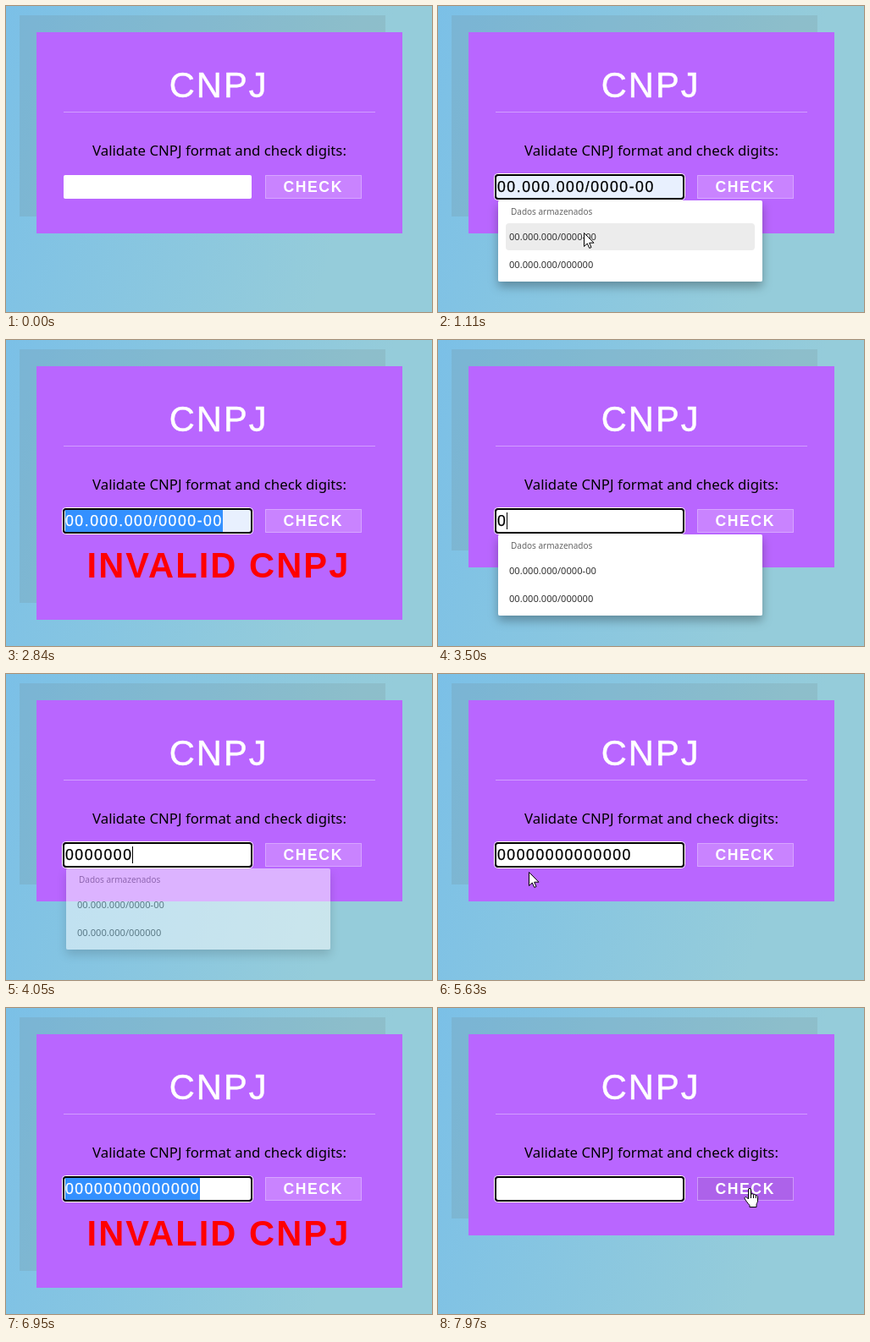
Animation, 503 px wide and 362 px high, one loop 8 s. Source, as an HTML page:

```html
<!DOCTYPE html>
<html lang="en">
<head>
<meta charset="utf-8">
<title>Format check</title>
<style>
  html, body { margin: 0; width: 100%; height: 100%; overflow: hidden; }
  svg { display: block; width: 503px; height: 362px; }
  text { white-space: pre; }
  .arial { font-family: "Liberation Sans", Arial, sans-serif; }
  .noto { font-family: "Noto Sans", sans-serif; }
  .bold { font-weight: bold; }
  #title, #result { font-size: 41.6px; letter-spacing: 2.08px; }
  #value, #label { font-size: 17.6px; letter-spacing: 1.57px; }
  #title { stroke: #fff; stroke-width: .5px; }
  #value { stroke-width: .25px; }
</style>
</head>
<body>
<svg viewBox="0 0 503 362">
  <defs>
    <linearGradient id="sky" gradientUnits="userSpaceOnUse" x1="0" y1="0" x2="430" y2="115">
      <stop offset="0" stop-color="#7bc0e7"/>
      <stop offset="1" stop-color="#95ccda"/>
    </linearGradient>
    <filter id="soft" x="-20%" y="-20%" width="140%" height="160%">
      <feDropShadow dx="0" dy="6" stdDeviation="6" flood-color="#000" flood-opacity=".3"/>
    </filter>
    <clipPath id="below"><rect y="230" width="503" height="132"/></clipPath>
  </defs>

  <rect width="503" height="362" fill="url(#sky)"/>
  <rect id="shade" x="16" y="11" width="432" fill="#6e8282" opacity=".18"/>
  <rect id="panel" x="36" y="31" width="432" fill="#b966ff"/>

  <text id="title" class="arial" x="192.7" y="108" fill="#fff">CNPJ</text>
  <rect x="68" y="125" width="368" height="1" fill="#fff" opacity=".35"/>
  <text class="noto" x="102" y="176.5" font-size="16.8">Validate CNPJ format and check digits:</text>

  <rect id="button" x="306.5" y="200.5" width="113" height="27" stroke="#fff" stroke-opacity=".35"/>
  <text id="label" class="arial bold" x="327.5" y="220" fill="#fff">CHECK</text>
  <text id="result" class="arial bold" x="95.6" y="281" fill="#f00">INVALID CNPJ</text>

  <rect id="field" x="68" y="200" width="222" height="28" rx="2"/>
  <g id="ring" fill="none">
    <rect x="66.5" y="198.5" width="225" height="31" rx="4" stroke="#fff"/>
    <rect x="68" y="200" width="222" height="28" rx="3" stroke="#000" stroke-width="2"/>
  </g>
  <rect id="selection" x="70" y="201" height="26" fill="#3390ff"/>
  <text id="value" class="arial" x="70" y="220"></text>
  <rect id="caret" y="204" width="1" height="20"/>

  <g clip-path="url(#below)">
    <g id="list" class="noto" font-size="11.15" fill="#333">
      <rect x="71" y="230" width="312" height="96" rx="2" fill="#fff" filter="url(#soft)"/>
      <rect id="row" x="80" y="257" width="294" height="32" rx="4" fill="#ececec"/>
      <text x="86" y="247" font-size="10" fill="#666">Dados armazenados</text>
      <text x="84" y="277">00.000.000/0000-00</text>
      <text x="84" y="310">00.000.000/000000</text>
    </g>
  </g>

  <g id="cursor" fill="#fff" stroke="#000" stroke-linejoin="round">
    <path id="arrow" d="M.5 .5V16.5L4.3 13L6.8 18.5L9 17.5L6.7 12.2H12z"/>
    <g id="hand" transform="translate(-7 -1)">
      <path d="M5.5 13V2a1.5 1.5 0 0 1 3 0V8a1.5 1.5 0 0 1 3 .3a1.5 1.5 0 0 1 2.8 .7a1.4 1.4 0 0 1 2.2 1.2V15c0 2-1.5 3-1.5 5V22.5H7V20.5C5 18 3 16 1.2 12.5C.5 11 2.5 10 3.5 11z"/>
      <path d="M8.5 7.5V12M11.5 8.3V12M14.3 9V12" fill="none"/>
    </g>
    <path id="beam" d="M-3 -8.5H-1L0 -7.5L1 -8.5H3M0 -7.5V7.5M-3 8.5H-1L0 7.5L1 8.5H3" fill="none"/>
  </g>
</svg>
<script>
const LOOP = 8000, TICK = 90;
const $ = id => document.getElementById(id);
const set = (id, attrs) => {
  for (const key in attrs) $(id).setAttribute(key, attrs[key]);
};
const show = (id, on) => set(id, { visibility: on ? 'visible' : 'hidden' });
const zeros = n => '0'.repeat(n);

// Each step changes part of the state and stays until the next one.
const steps = [
  [0, { text: '', filled: 0, focus: 0, caret: 0, list: 0, row: 0, selected: 0, press: 0, result: 0 }],
  [810, { focus: 1, caret: 1, list: 1 }],
  [1010, { text: '00.000.000/0000-00', filled: 1, caret: 0, row: 1 }],
  [1290, { list: .5, row: 0, caret: 1 }],
  [1380, { list: 0 }],
  [1740, { caret: 0 }],
  [1920, { press: 1 }],
  [2010, { press: 0, focus: 0, result: 1 }],
  [2560, { focus: 1, caret: 1 }],
  [2750, { selected: 1, caret: 0 }],
  [3500, { text: '0', filled: 0, selected: 0, caret: 1, result: 0, list: 1 }],
  [3960, { text: zeros(4) }],
  [4050, { text: zeros(7), list: .5 }],
  [4140, { text: zeros(11), list: 0 }],
  [4510, { text: zeros(12) }],
  [4690, { text: zeros(13) }],
  [5080, { text: zeros(14) }],
  [5630, { caret: 0 }],
  [6080, { press: 1 }],
  [6200, { press: 0, focus: 0, result: 1 }],
  [6740, { focus: 1, caret: 1 }],
  [6830, { selected: 1, caret: 0 }],
  [7430, { text: '', selected: 0, result: 0, caret: 1 }],
  [7970, { press: 1, caret: 0 }]
];

// Pointer tracks: time, x, y; each track hides at its end time.
const tracks = [
  { end: 2840, points: [
    [270, 214, 301], [630, 192, 217], [920, 192, 217], [1010, 180, 262], [1110, 172, 268],
    [1290, 172, 268], [1560, 360, 223], [1920, 360, 223], [2380, 262, 214]] },
  { end: 6950, points: [
    [5630, 107, 234], [5720, 170, 245], [5810, 262, 240], [5900, 336, 215],
    [6380, 336, 215], [6740, 170, 215]] },
  { end: LOOP, points: [[7520, 225, 238], [7880, 362, 216], [7970, 368, 214]] }
];

function pointerAt(t) {
  const track = tracks.find(k => t >= k.points[0][0] && t < k.end);
  if (!track) return null;
  const { points } = track;
  const i = points.findLastIndex(p => p[0] <= t);
  const [t0, x0, y0] = points[i];
  if (i === points.length - 1) return [x0, y0];
  const [t1, x1, y1] = points[i + 1];
  const k = Math.floor((t - t0) / TICK) * TICK / (t1 - t0);
  return [x0 + (x1 - x0) * k, y0 + (y1 - y0) * k].map(Math.round);
}

function drawPointer(t) {
  const at = pointerAt(t);
  set('cursor', { display: at ? 'inline' : 'none' });
  if (!at) return;
  const [x, y] = at;
  const inRow = y >= 200 && y < 229;
  const kind = inRow && x >= 306 && x < 420 ? 'hand'
    : inRow && x >= 68 && x < 290 ? 'beam' : 'arrow';
  set('cursor', { transform: `translate(${x} ${y})` });
  for (const id of ['arrow', 'hand', 'beam']) show(id, id === kind);
}

function draw(t) {
  const s = Object.assign({}, ...steps.filter(k => k[0] <= t).map(k => k[1]));
  const height = s.result ? 300 : 238;
  set('panel', { height });
  set('shade', { height });
  show('result', s.result);
  set('button', { fill: s.press ? '#ad62ea' : '#c983ff' });
  set('field', { fill: s.filled ? '#e8f0fe' : '#fff' });
  show('ring', s.focus);

  const value = $('value');
  const ink = s.selected ? '#fff' : '#000';
  if (value.textContent !== s.text) value.textContent = s.text;
  set('value', { fill: ink, stroke: ink });
  const width = s.text ? Math.round(value.getComputedTextLength()) : 0;
  set('selection', { width });
  show('selection', s.selected);
  set('caret', { x: 70 + width });
  show('caret', s.caret);

  set('list', { opacity: s.list });
  show('row', s.row);
  drawPointer(t);
}

function loop() {
  draw(performance.now() % LOOP);
  requestAnimationFrame(loop);
}
loop();
</script>
</body>
</html>
```
